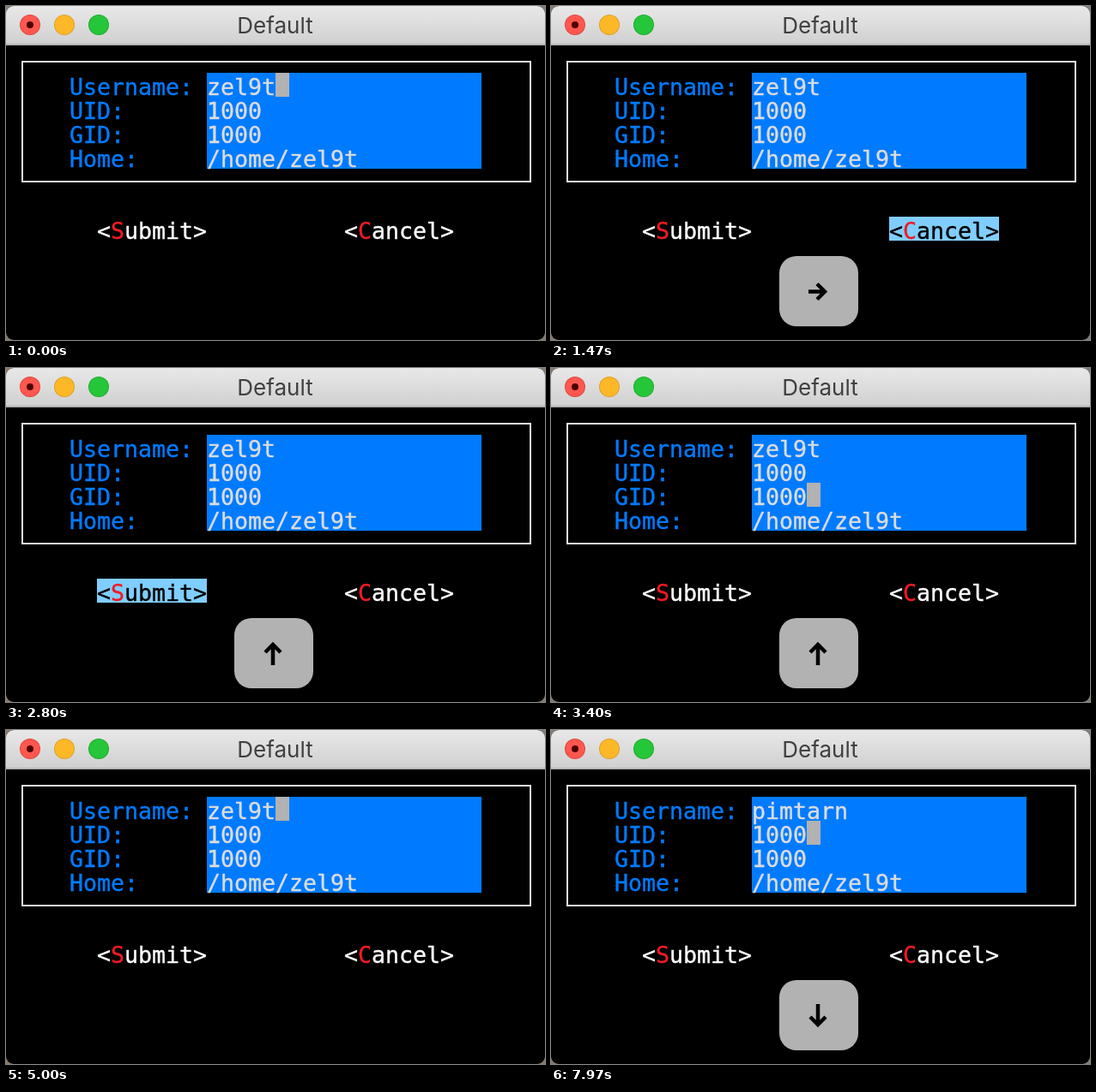
These frames come from a looping animation (628x390 px, 8 s). An HTML page with a canvas:

```html
<!DOCTYPE html>
<html lang="en">
<head>
<meta charset="utf-8">
<title>Form demo</title>
<style>
  html, body { margin: 0; width: 628px; height: 390px; overflow: hidden; background: #000; }
  canvas { display: block; }
</style>
</head>
<body>
<canvas id="stage" width="628" height="390"></canvas>
<script>
const ctx = document.getElementById('stage').getContext('2d');
const LOOP = 8000, CELL = 16, ROW = 28, LEFT = 74, FIELD = 234, TOP = 78;
const MONO = '"DejaVu Sans Mono", monospace';
const BLUE = '#007bff', GREY = '#b2b2b2', RED = '#ee1c24', TEXT = '#dcdcdc';
const SUBMIT = 4, CANCEL = 5;
const OLD_NAME = 'zel9t', NEW_NAME = 'pimtarn';

// Each entry: time in ms and the part of the state that changes.
const events = [
  [600, { key: '↑' }], [700, { focus: SUBMIT }], [1100, { key: '' }],
  [1200, { key: '→' }], [1300, { focus: CANCEL }], [1870, { key: '' }],
  [2130, { key: '←' }], [2230, { focus: SUBMIT }], [2630, { key: '' }],
  [2770, { key: '↑' }], [2870, { focus: 3 }], [3200, { key: '' }],
  [3300, { key: '↑' }], [3400, { focus: 2 }], [3870, { key: '' }],
  [3900, { key: '↑' }], [3970, { focus: 1 }], [4430, { key: '' }],
  [4500, { key: '↑' }], [4600, { focus: 0 }], [5000, { key: '' }],
  [5070, { key: '⌫' }]
];
[5130, 5300, 5470, 5700, 5900].forEach((t, i) =>
  events.push([t, { name: OLD_NAME.slice(0, 4 - i) }]));
const pressed = [6200, 6430, 6670, 6900, 7030, 7170, 7330];
const typed = [6300, 6570, 6870, 7000, 7130, 7270, 7470];
pressed.forEach((t, i) => events.push(
  [t, { key: NEW_NAME[i] }],
  [typed[i], { name: NEW_NAME.slice(0, i + 1) }]));
events.push([7670, { key: '↓' }], [7770, { focus: 1 }]);

function stateAt(t) {
  const state = { key: '', focus: 0, name: OLD_NAME };
  for (const [at, change] of events) if (at <= t) Object.assign(state, change);
  return state;
}

function rect(x, y, w, h, color) {
  ctx.fillStyle = color;
  ctx.fillRect(x, y, w, h);
}

function round(x, y, w, h, r, color) {
  ctx.fillStyle = color;
  ctx.beginPath();
  ctx.roundRect(x, y, w, h, r);
  ctx.fill();
}

function dot(x, r, color) {
  ctx.fillStyle = color;
  ctx.beginPath();
  ctx.arc(x, 22, r, 0, 2 * Math.PI);
  ctx.fill();
}

// Terminal text: one character per cell, with a hairline for weight.
function write(text, x, y, color) {
  ctx.font = '26.6px ' + MONO;
  ctx.textAlign = 'left';
  ctx.fillStyle = ctx.strokeStyle = color;
  ctx.lineWidth = 0.4;
  [...text].forEach((c, i) => {
    ctx.fillText(c, x + i * CELL, y + 26);
    ctx.strokeText(c, x + i * CELL, y + 26);
  });
}

function drawWindow() {
  rect(0, 0, 628, 390, '#857a70');
  round(0, 0, 628, 390, 9, '#000');
  const bar = ctx.createLinearGradient(0, 0, 0, 45);
  bar.addColorStop(0, '#e8e8e8');
  bar.addColorStop(1, '#d0d0d0');
  round(0, 0, 628, 45, [9, 9, 0, 0], bar);
  rect(0, 44, 628, 2, '#b4b4b4');
  [['#e2463f', '#ff5750'], ['#e0a028', '#fdb827'], ['#1dad2b', '#26c63a']]
    .forEach(([edge, fill], i) => {
      dot(28 + 40 * i, 12, edge);
      dot(28 + 40 * i, 11, fill);
    });
  dot(28, 4, '#4d0000');
  ctx.font = '26px Inter, sans-serif';
  ctx.textAlign = 'center';
  ctx.fillStyle = '#404040';
  ctx.fillText('Default', 313.5, 32);
}

function drawForm({ name, focus }) {
  ctx.strokeStyle = '#e0e0e0';
  ctx.lineWidth = 2;
  ctx.strokeRect(19, 65, 592, 140);
  rect(FIELD, TOP, 320, 4 * ROW, BLUE);
  const rows = [['Username:', name], ['UID:', '1000'], ['GID:', '1000'], ['Home:', '/home/' + OLD_NAME]];
  rows.forEach(([label, value], i) => {
    const y = TOP + i * ROW;
    write(label, LEFT, y, BLUE);
    write(value, FIELD, y, TEXT);
    if (focus === i) rect(FIELD + value.length * CELL, y, CELL, ROW, GREY);
  });
}

function drawButton(label, x, focused) {
  const y = 246, color = focused ? '#000' : '#fff';
  if (focused) rect(x, y, 8 * CELL, ROW, '#80ceff');
  write('<', x, y, color);
  write(label[0], x + CELL, y, RED);
  write(label.slice(1) + '>', x + 2 * CELL, y, color);
}

function drawArrow(turns, half) {
  const neck = half - 3;
  ctx.save();
  ctx.translate(311, 333.5);
  ctx.rotate(turns * Math.PI / 2);
  ctx.lineWidth = 4.5;
  ctx.stroke(new Path2D(`M${-half} 0H${neck}M${neck - 9} -9L${neck} 0L${neck - 9} 9`));
  ctx.restore();
}

function drawKey(key) {
  if (!key) return;
  round(266, 292, 92, 82, 20, GREY);
  ctx.strokeStyle = ctx.fillStyle = '#000';
  const turns = '→↓←↑'.indexOf(key);
  if (turns >= 0) {
    drawArrow(turns, turns % 2 ? 13.5 : 11);
  } else if (key === '⌫') {
    ctx.lineWidth = 2.5;
    ctx.stroke(new Path2D('M302 334l6-7h12v14h-12zM310 331l6 6m0-6l-6 6'));
  } else {
    ctx.font = 'bold 36px ' + MONO;
    ctx.textAlign = 'center';
    ctx.fillText(key, 311.5, 346);
  }
}

function draw(now) {
  const state = stateAt(now % LOOP);
  drawWindow();
  drawForm(state);
  drawButton('Submit', 106, state.focus === SUBMIT);
  drawButton('Cancel', 394, state.focus === CANCEL);
  drawKey(state.key);
}

const start = performance.now();
function tick() {
  draw(performance.now() - start);
  requestAnimationFrame(tick);
}
tick();
</script>
</body>
</html>
```
